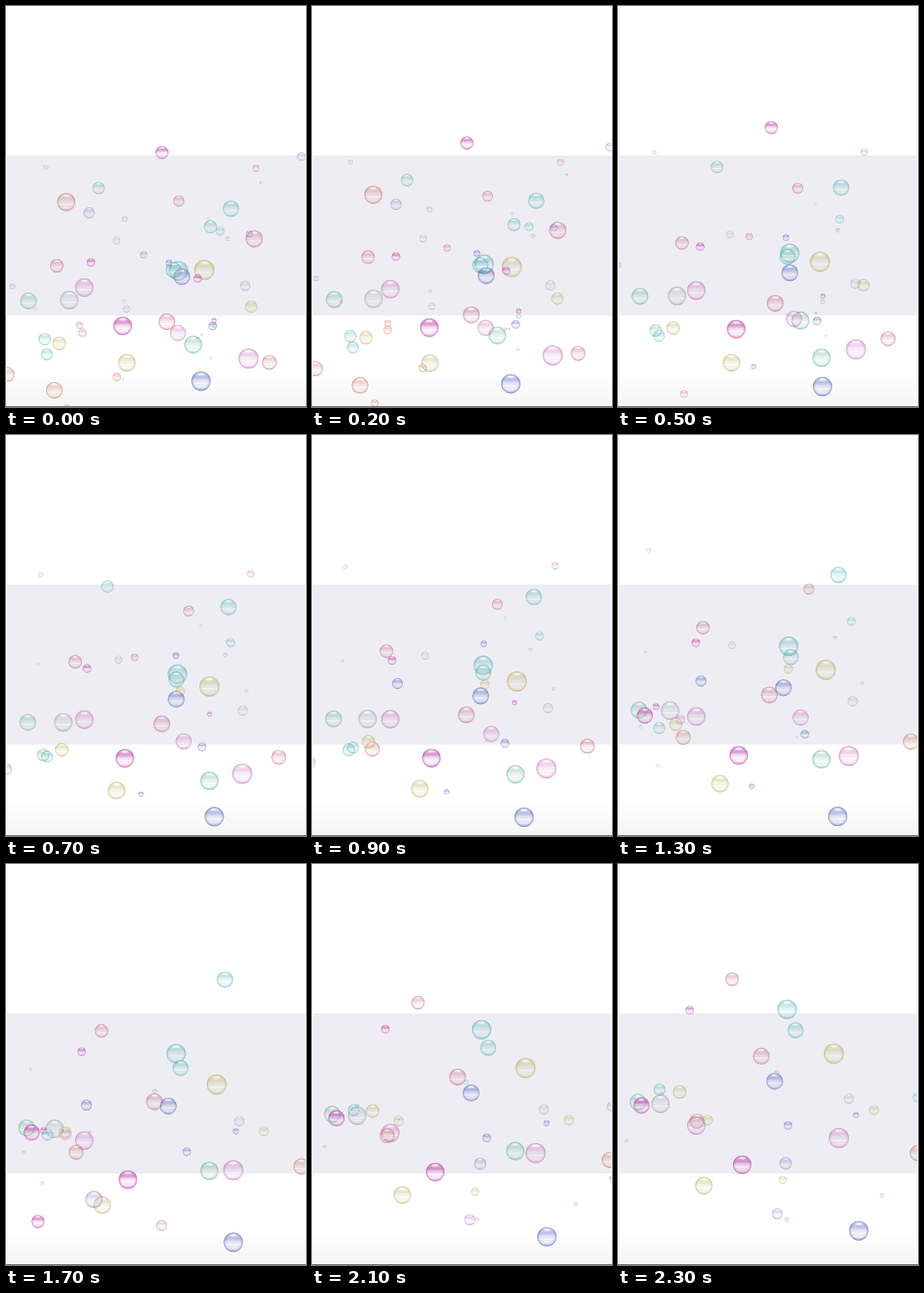
Recreate the animation shown at these times as an HTML page with a canvas. Size 360 by 480 pixels, loop 2400 ms.

```html
<!DOCTYPE html>
<html lang="en">
<head>
<meta charset="utf-8">
<title>Rising bubbles</title>
<style>
  html, body { margin: 0; width: 100%; height: 100%; overflow: hidden; background: #fff; }
  canvas { display: block; }
</style>
</head>
<body>
<canvas id="stage" width="360" height="480"></canvas>
<script>
const g = document.getElementById('stage').getContext('2d');
const LOOP = 2400, STEP = 100, LAST = 24.1, LIFT = 0.09;
const TINTS = {
  magenta: '180,46,160', pink: '186,84,172', violet: '138,88,180',
  blue: '66,80,180', rose: '180,62,100', red: '186,86,70',
  yellow: '166,156,56', teal: '46,160,160', green: '66,160,132',
  grey: '122,132,140'
};
const STRENGTH = { magenta: 1, blue: 0.9, grey: 0.7 };
const names = Object.keys(TINTS);

// The bubbles that last: tint, radius, first place, last place.
const lasting = [
  ['magenta', 11, 140, 383, 149, 360],
  ['magenta', 5, 102, 307, 86, 175],
  ['pink', 12, 291, 422, 265, 328],
  ['pink', 11, 94, 337, 94, 313],
  ['blue', 11.5, 234, 449, 289, 439],
  ['blue', 10, 211, 324, 188, 260],
  ['blue', 5, 248, 383, 204, 313],
  ['rose', 8, 61, 311, 137, 138],
  ['rose', 10, 193, 378, 172, 230],
  ['yellow', 12, 238, 316, 259, 227],
  ['yellow', 8, 64, 404, 74, 273],
  ['yellow', 10.5, 145, 427, 103, 385],
  ['teal', 11.5, 207, 317, 203, 174],
  ['teal', 9.5, 201, 316, 213, 199],
  ['teal', 7, 49, 417, 50, 270],
  ['green', 10, 27, 353, 24, 285],
  ['grey', 11, 76, 352, 51, 287],
  ['grey', 6, 287, 335, 277, 281]
];

const bubbles = lasting.map(([name, r, x, y, x2, y2]) => ({
  name, r, x, y, born: 0, dies: LAST,
  vx: (x2 - x) / LAST,
  vy: (y2 - y) / LAST + LIFT * LAST
}));

let seed = 20;
function random(min = 0, max = 1) {
  seed = (seed * 1664525 + 1013904223) % 4294967296;
  return min + (max - min) * seed / 4294967296;
}

// Short-lived bubbles: most are there at the start, the rest appear later.
function scatter(count, fresh) {
  for (let i = 0; i < count; i++) {
    const born = fresh ? random(2, 22) : 0;
    const nearMiddle = (random() + random() + random()) / 3;
    bubbles.push({
      name: names[Math.floor(random(0, names.length))],
      r: 1 + 10 * random() ** 1.8,
      x: random(0, 360),
      y: fresh ? random(270, 445) : 120 + 400 * nearMiddle,
      born,
      dies: born + (fresh ? random(6, 20) : 2 + 16 * random() ** 2),
      vx: random(-1.8, 1.8),
      vy: fresh ? random(-4, 1) : random(-6, -1)
    });
  }
}
scatter(42, false);
scatter(30, true);
bubbles.sort((p, q) => q.r - p.r);

function background() {
  g.fillStyle = '#fff';
  g.fillRect(0, 0, 360, 480);
  g.fillStyle = '#eeedf3';
  g.fillRect(1, 179, 358, 191.5);
  const shade = g.createLinearGradient(0, 440, 0, 479);
  shade.addColorStop(0, '#fff');
  shade.addColorStop(1, '#f4f4f4');
  g.fillStyle = shade;
  g.fillRect(0, 440, 360, 39);
  g.fillStyle = '#666';
  g.fillRect(0, 479, 360, 1);
}

function drawBubble({ name, r }, x, y) {
  const strength = STRENGTH[name] || 0.8;
  const tint = a => `rgba(${TINTS[name]},${a * strength})`;
  const white = a => `rgba(255,255,255,${a})`;
  const fillDisc = (gradient, stops) => {
    stops.forEach(([at, colour]) => gradient.addColorStop(at, colour));
    g.fillStyle = gradient;
    g.beginPath();
    g.arc(x, y, r, 0, 7);
    g.fill();
  };

  // A coloured band above, a clear middle and a soft glow below.
  fillDisc(g.createLinearGradient(0, y - r, 0, y + r), [
    [0, tint(0.1)], [0.3, tint(0.5 * strength ** 2)], [0.5, tint(0.12)],
    [0.62, white(0.35)], [0.78, tint(0.06)], [1, tint(0.3)]
  ]);
  fillDisc(g.createRadialGradient(x, y, r * 0.7, x, y, r), [
    [0, tint(0)], [0.6, tint(0.2)], [1, tint(0.75)]
  ]);

  g.fillStyle = white(0.65);
  g.beginPath();
  g.ellipse(x, y - r * 0.72, r * 0.35, r * 0.12, 0, 0, 7);
  g.fill();
}

function frame(now) {
  const n = Math.floor(now % LOOP / STEP);
  const u = n + Math.max(0, n - 21) * 0.55; // the drift quickens at the end
  background();
  g.save();
  g.beginPath();
  g.rect(1, 0, 358, 479);
  g.clip();
  for (const b of bubbles) {
    if (u < b.born || u > b.dies) continue;
    const t = u - b.born;
    const x = b.x + b.vx * t;
    const y = b.y + b.vy * t - LIFT * t * t;
    if (y - b.r > 50) drawBubble(b, x, y);
  }
  g.restore();
}

const start = performance.now();
function tick() {
  frame(performance.now() - start);
  requestAnimationFrame(tick);
}
tick();
</script>
</body>
</html>
```
